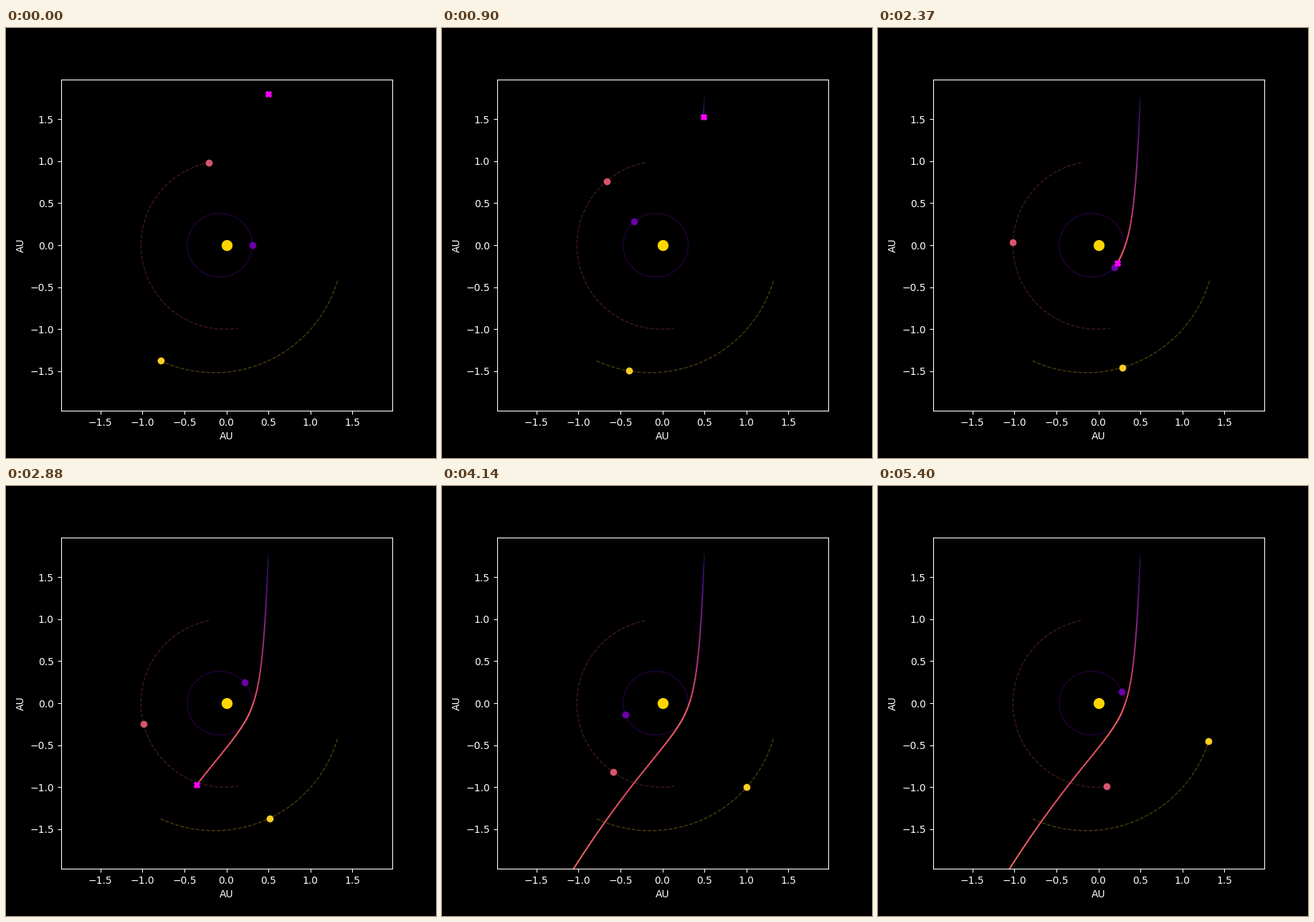
A matplotlib script that plays this animation: 600 by 600 pixels, repeating every 5430 ms.

```python
import numpy as np
import matplotlib.pyplot as plt
from matplotlib.animation import FuncAnimation
from matplotlib.collections import LineCollection

GM = 2.9591e-4      # AU^3 / day^2
THRUST = 4.99e-4    # AU / day^2, about 0.01 m/s^2
FRAMES = 181        # one day per frame
SPAN = 182.6        # half a year
LIMIT = 1.97


def orbit(day, a, e, mean0):
    """Position on a Kepler ellipse with its perihelion on the +x axis."""
    mean = np.radians(mean0) + np.sqrt(GM / a**3) * np.asarray(day, float)
    ecc = mean + e * np.sin(mean)
    for _ in range(8):
        ecc = ecc - (ecc - e * np.sin(ecc) - mean) / (1 - e * np.cos(ecc))
    return a * (np.cos(ecc) - e), a * np.sqrt(1 - e * e) * np.sin(ecc)


def fly(days):
    """Probe released at rest, pulled by the sun and pushed along -y."""
    pos, vel = np.array([0.5, 1.8]), np.zeros(2)
    path, speed = [pos], [0.0]
    for _ in range(days):
        pull = -GM * pos / np.hypot(*pos)**3
        vel = vel + pull + np.array([0, -THRUST])
        pos = pos + vel
        path.append(pos)
        speed.append(np.hypot(*vel))
    return np.array(path), np.array(speed)


# semi-major axis, eccentricity, starting mean anomaly in degrees
planets = [(0.387, 0.2056, 0), (1.0, 0.0167, 100), (1.524, 0.0934, 250)]
colors = plt.cm.plasma(np.linspace(0.2, 0.9, 3))

path, speed = fly(int(SPAN))
segments = np.stack([path[:-1], path[1:]], axis=1)

plt.style.use("dark_background")
fig, ax = plt.subplots(figsize=(6, 6), dpi=100)
ax.set_aspect("equal")
ax.set_xlim(-LIMIT, LIMIT)
ax.set_ylim(-LIMIT, LIMIT)
ax.set_xlabel("AU")
ax.set_ylabel("AU")

days = np.append(np.arange(int(SPAN) + 1), SPAN)
for p, c in zip(planets, colors):
    ax.plot(*orbit(days, *p), "--", color=c, lw=1, alpha=0.3)

trail = LineCollection([], cmap="magma", norm=plt.Normalize(0, speed.max()),
                       linewidths=1.5)
ax.add_collection(trail)
ax.plot(0, 0, "o", color="gold", ms=10)
dots = [ax.plot([], [], "o", color=c, ms=6)[0] for c in colors]
probe, = ax.plot([], [], "X", color="magenta", ms=6)


def update(day):
    for dot, p in zip(dots, planets):
        x, y = orbit(day, *p)
        dot.set_data([x], [y])
    probe.set_data(path[day:day + 1, 0], path[day:day + 1, 1])
    trail.set_segments(segments[:day])
    trail.set_array(speed[:day])
    return [trail, *dots, probe]


anim = FuncAnimation(fig, update, frames=FRAMES, interval=30, repeat=True,
                     repeat_delay=0)
plt.show()
```
